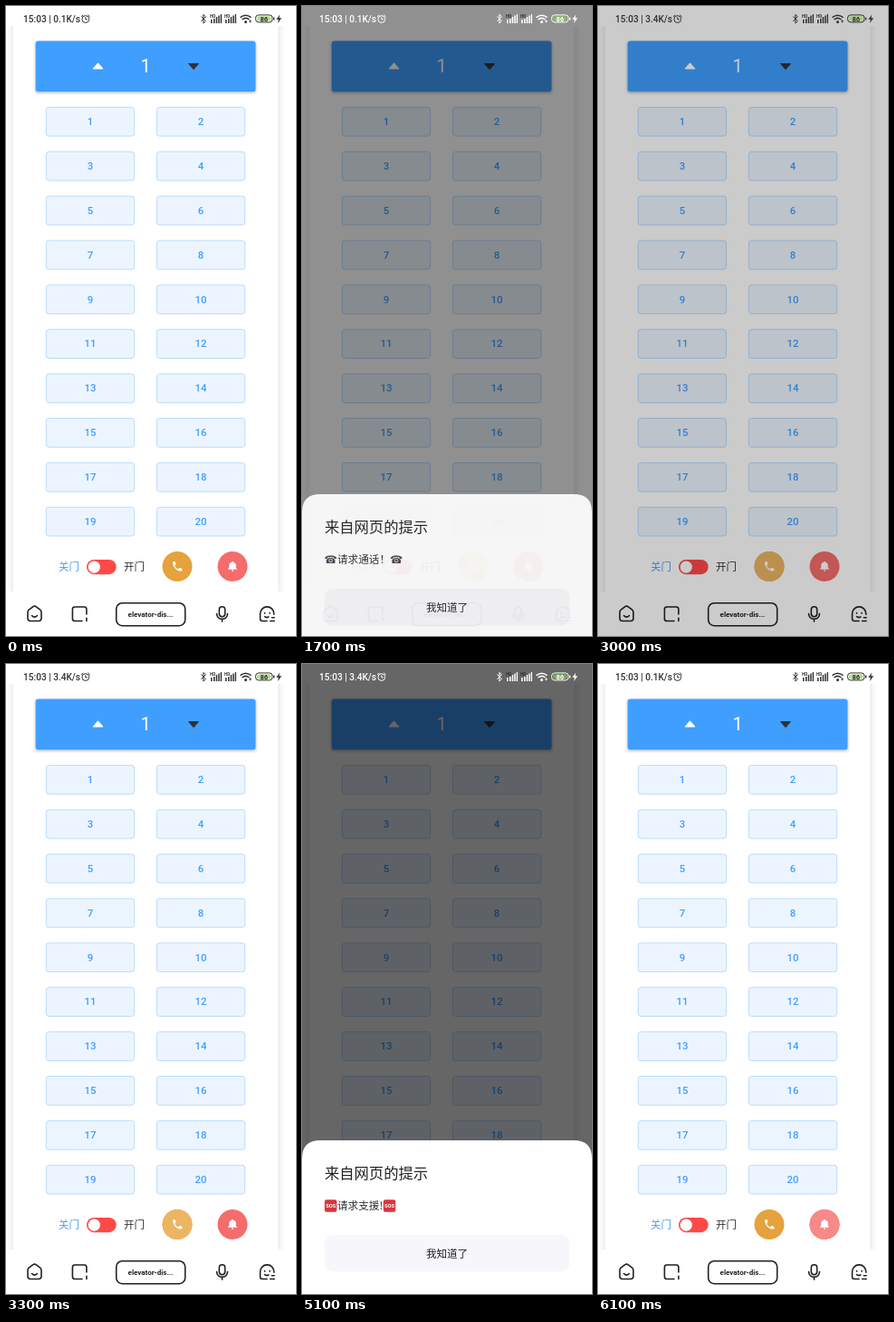
Write an HTML page that moves like this. It is 320 px wide and 693 px high and loops after 7000 ms.

```html
<!DOCTYPE html>
<html lang="zh-CN">
<head>
<meta charset="utf-8">
<title>Elevator panel</title>
<style>
  html, body { margin: 0; width: 100%; height: 100%; overflow: hidden; background: #fff; }
  svg { display: block; width: 100vw; height: 100vh; }
  text { font-family: Roboto, "Noto Sans CJK SC", "Noto Sans CJK", sans-serif; fill: #303133; }
  .cjk { font-family: "Noto Sans CJK SC", "Noto Sans CJK", sans-serif; }
  .mid { text-anchor: middle; }
  .line { fill: none; stroke: #202124; stroke-width: 1.6; stroke-linecap: round; stroke-linejoin: round; }
  #status text { fill: currentColor; }
  #status .thin { fill: none; stroke: currentColor; stroke-width: 1; }
  .floor rect { fill: #ecf5ff; stroke: #b3d8ff; stroke-width: .9; }
  .floor text { fill: #409eff; font-size: 11.4px; font-weight: 500; }
</style>
</head>
<body>
<svg viewBox="0 0 320 693">
  <defs>
    <filter id="blur" x="-20%" y="-20%" width="140%" height="140%"><feGaussianBlur stdDeviation="4.2"/></filter>
    <filter id="soft" x="-10%" y="-30%" width="120%" height="160%"><feGaussianBlur stdDeviation="1.8"/></filter>
    <clipPath id="page"><rect y="22" width="320" height="622"/></clipPath>
    <g id="signal">
      <text y="12.8" font-size="4.6" font-weight="700">HD</text>
      <path d="M1 19v-4h1.5v4zM4 19v-5h1.5v5zM6.7 19v-7h1.5v7zM9.2 19v-8.5h1.5v8.5zM11.7 19v-10h1.3v10z" fill="currentColor"/>
    </g>
    <g id="sos">
      <rect y="-10.7" width="13.4" height="13.4" rx="2" fill="#d9363e"/>
      <text class="mid" x="6.7" y="-1.9" font-size="5.8" font-weight="700" style="fill:#fff">SOS</text>
    </g>
  </defs>
  <rect width="320" height="693" fill="#fff"/>

  <g clip-path="url(#page)">
    <rect x="7" y="2" width="294" height="680" fill="#000" opacity=".12" filter="url(#blur)"/>
    <rect x="7.4" y="2" width="293.2" height="680" fill="#fff" stroke="#ebeef5" stroke-width=".8"/>
    <rect x="32" y="39" width="244" height="57" rx="3" fill="#000" opacity=".22" filter="url(#soft)"/>
    <rect x="32.7" y="38.4" width="242.7" height="55.8" rx="3" fill="#409eff"/>
    <path d="M96 69l5.5-6.2 5.5 6.2z" fill="#fff" stroke="#fff" stroke-linejoin="round"/>
    <path d="M201.500 63.500l5.500 6.200 5.500-6.200z" fill="#303133" stroke="#303133" stroke-linejoin="round"/>
    <text class="mid" x="154" y="73" font-size="20" style="fill:#fff">1</text>
    <g id="floors"></g>

    <text class="cjk" x="58" y="621" font-size="11.4" style="fill:#409eff">关门</text>
    <rect x="89" y="609" width="32.700" height="16.200" rx="8.100" fill="#ff4949"/>
    <circle cx="97.300" cy="617.100" r="6.600" fill="#fff"/>
    <text class="cjk" x="130" y="621" font-size="11.4">开门</text>

    <circle cx="189" cy="616.500" r="16.500" fill="#e6a23c"/>
    <circle id="callHover" cx="189" cy="616.500" r="16.500" fill="#ebb563"/>
    <path transform="translate(182.300 609.600) scale(.57)" fill="#fff" d="M6.620 10.790c1.440 2.830 3.760 5.140 6.590 6.590l2.200-2.200c.27-.27.67-.36 1.020-.24 1.120.37 2.330.57 3.570.57.55 0 1 .45 1 1V20c0 .55-.45 1-1 1-9.390 0-17-7.610-17-17 0-.55.45-1 1-1h3.500c.55 0 1 .45 1 1 0 1.250.2 2.450.57 3.570.11.35.03.74-.25 1.020z"/>
    <circle cx="250" cy="616.500" r="16.500" fill="#f56c6c"/>
    <circle id="bellHover" cx="250" cy="616.500" r="16.500" fill="#f78989"/>
    <path d="M245 619.800v-.6l1.200-1.200v-2.600q0-3 3-3.700v-.5q.8-1 1.600 0v.5q3 .7 3 3.700v2.600l1.200 1.200v.6zM248.700 620.500h2.600q-.2 1.400-1.300 1.400t-1.300-1.400z" fill="#fff"/>
  </g>

  <g class="line">
    <path d="M24 667q0-1.800 1.300-2.800l4.700-3.500q1.500-1.100 3 0l4.700 3.500q1.300 1 1.300 2.800v6.500q0 3-3 3h-9q-3 0-3-3zM28.500 670.500q3 3.300 6 0"/>
    <path d="M84 676.500h-8q-2.600 0-2.600-2.600v-10.300q0-2.600 2.600-2.600h10.300q2.600 0 2.600 2.600v5.400M88.900 673.300v3.200"/>
    <rect x="121.700" y="656.700" width="76" height="25" rx="6.500"/>
    <rect x="235.300" y="660.700" width="6.400" height="11" rx="3.200"/>
    <path d="M232.500 668.500q.4 5.800 6 5.800t6-5.800M238.500 674.300v2.800"/>
    <path d="M288 676.500h-5q-2.500 0-2.500-2.500v-5.500a7.600 7.600 0 0 1 15.200 0v.8M285.500 667.500v.6M291 667.500v.6M285.500 671.700q2 1.700 4.300.3M293.300 672.700h2.800M291.500 676.500h4.600"/>
  </g>
  <text class="mid" x="159.500" y="672" font-size="8" font-weight="700" style="fill:#202124">elevator-dis...</text>

  <rect id="shade" width="320" height="693"/>

  <g id="status">
    <text id="speed" x="19" y="17.800" font-size="10.100" font-weight="500"></text>
    <g class="thin">
      <circle cx="87.800" cy="14.500" r="3.900"/>
      <path d="M87.800 12.200v2.600h2M83 11.800l2.200-2M92.600 11.800l-2.200-2"/>
      <path d="M215.300 11.500l5 5-2.500 2.400v-9.500l2.500 2.300-5 5"/>
      <path d="M258.500 12.700q6-5 12 0M260.500 15q4-3.300 8 0" stroke-width="1.500"/>
      <rect x="275.500" y="9.900" width="18.500" height="8" rx="3.300"/>
    </g>
    <circle cx="264.500" cy="17.500" r="1.500" fill="currentColor"/>
    <path d="M268 16.800h3M269.500 15.300v3" stroke="currentColor" stroke-width=".8"/>
    <rect x="277" y="11.300" width="15.500" height="5.200" rx="2" fill="#8fce55" opacity=".65"/>
    <path d="M295.600 12.500v3" stroke="currentColor" stroke-width="1.300"/>
    <text class="mid" x="284.800" y="16.700" font-size="7.500" font-weight="700">86</text>
    <path d="M302.200 9.500l-4 5.200h2.600l-1 4.200 4.300-5.600h-2.700z" fill="currentColor"/>
    <use href="#signal" x="225"/>
    <use href="#signal" x="241"/>
  </g>

  <g id="sheet">
    <path d="M0 730V544q0-20 20-20h280q20 0 20 20v186z" fill="#fff"/>
    <text class="cjk" x="25" y="566" font-size="16.300" font-weight="500" style="fill:#202124">来自网页的提示</text>
    <g id="callMsg">
      <g style="font-family:'DejaVu Sans',sans-serif" font-size="11.500">
        <text x="24.500" y="600" style="font-family:inherit;fill:#45454f">☎</text>
        <text x="97" y="600" style="font-family:inherit;fill:#45454f">☎</text>
      </g>
      <text class="cjk" x="39" y="600" font-size="11.600">请求通话！</text>
    </g>
    <g id="helpMsg">
      <use href="#sos" x="25" y="600"/>
      <text class="cjk" x="39" y="600" font-size="11.600">请求支援!</text>
      <use href="#sos" x="89.800" y="600"/>
    </g>
    <rect x="25" y="628" width="270" height="40.500" rx="9" fill="#f7f6fa"/>
    <text class="cjk mid" x="160" y="652.800" font-size="11.500" font-weight="500" style="fill:#202124">我知道了</text>
  </g>
</svg>
<script>
const LOOP = 7000, SHEET_HEIGHT = 169;
const $ = id => document.getElementById(id);
const ramp = (t, start, length) => Math.min(1, Math.max(0, (t - start) / length));
const show = (id, on) => $(id).style.display = on ? '' : 'none';

$('floors').innerHTML = Array.from({ length: 20 }, (_, i) => {
  const x = 44.300 + i % 2 * 122.100, y = 111.400 + (i >> 1) * 48.880;
  return `<g class="floor" transform="translate(${x} ${y})">
    <rect width="97.300" height="31.700" rx="3"/><text class="mid" x="48.700" y="19.700">${i + 1}</text></g>`;
}).join('');

function draw(t) {
  const first = t < 3800;
  const [open, close] = first ? [1412, 2830] : [4380, 5130];
  const enter = ramp(t, open, 400);
  const leave = ramp(t, close, 150);
  const slide = (1 - (1 - enter) ** 2) * (1 - leave ** 1.5);

  $('shade').setAttribute('opacity', .6 * enter * (1 - ramp(t, close, 260)));
  $('sheet').setAttribute('transform', `translate(0 ${SHEET_HEIGHT * (1 - slide)})`);
  $('sheet').setAttribute('opacity', slide);
  show('callMsg', first);
  show('helpMsg', !first);

  $('status').style.color = enter > .3 && leave < 1 ? '#fff' : '#303133';
  $('speed').textContent = `15:03 | ${t >= 2100 && t < 6000 ? '3.4' : '0.1'}K/s`;

  const moved = ramp(t, 4450, 100);
  $('callHover').setAttribute('opacity', ramp(t, 1300, 100) * (1 - moved));
  $('bellHover').setAttribute('opacity', moved);
}

const start = performance.now();
function tick() {
  draw((performance.now() - start) % LOOP);
  requestAnimationFrame(tick);
}
tick();
</script>
</body>
</html>
```
